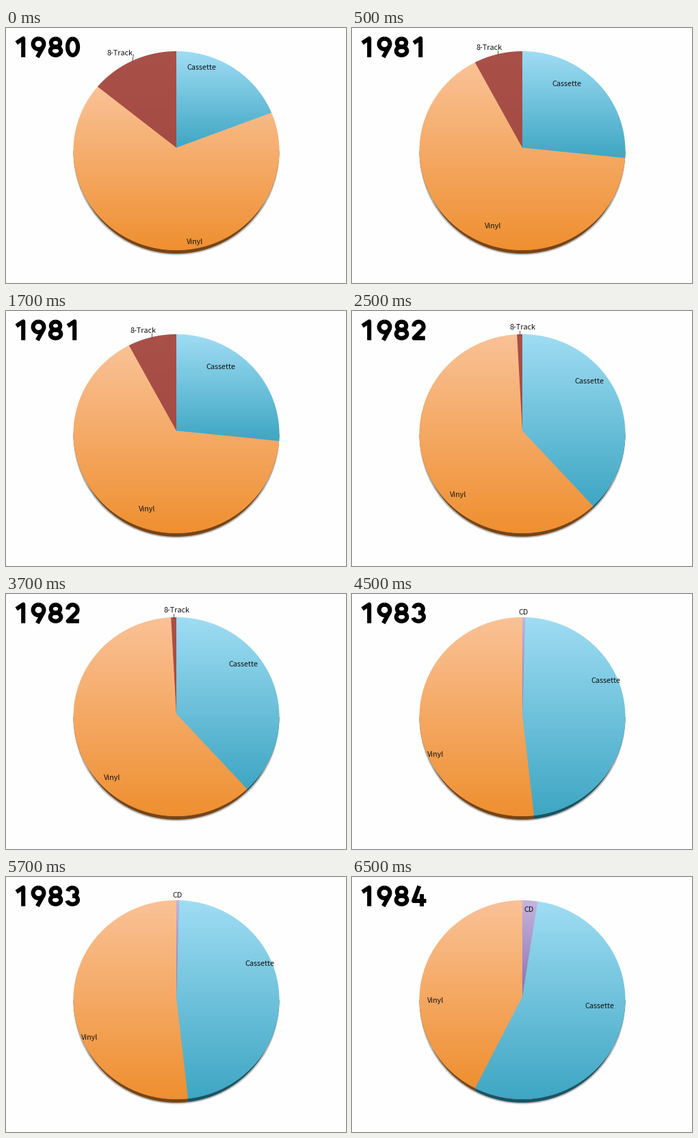
A matplotlib script that plays this animation: 497 px wide and 373 px high, repeating every 8 s.

```python
import numpy as np
import matplotlib.pyplot as plt
from matplotlib.animation import FuncAnimation
from matplotlib.colors import LinearSegmentedColormap
from matplotlib.patches import Ellipse, Polygon

W, H, DPI = 497, 373, 64
PT = 72 / DPI                      # points per pixel
FACE = (249, 179.5, 150.5, 145.5)  # centre x, centre y, radius x, radius y
BASE = (249, 183, 148, 147)
APEX = (249, 175)

# top colour, bottom colour, rim colour
PAINT = {
    "Cassette": ("#a0ddf4", "#3ea6c3", "#185565"),
    "Vinyl": ("#fac297", "#ef8f30", "#7a4413"),
    "8-Track": ("#a95149", "#a44b44", "#552420"),
    "CD": ("#c5b5de", "#8c6eb2", "#45345c"),
}

# per year: slices (name, start, end in degrees), labels (name, centre x, baseline), leader line
YEARS = [
    ("1980",
     [("Vinyl", 67.5, 310.1), ("Cassette", 0, 67.5), ("8-Track", 310.1, 360)],
     [("8-Track", 167, 40), ("Cassette", 285.5, 61), ("Vinyl", 276.3, 316)],
     [(186.5, 39), (185, 48)]),
    ("1981",
     [("Vinyl", 94.2, 332.6), ("Cassette", 0, 94.2), ("8-Track", 332.6, 360)],
     [("8-Track", 201, 32), ("Cassette", 314, 85), ("Vinyl", 206, 293)],
     [(213, 33), (213, 39)]),
    ("1982",
     [("Vinyl", 136.6, 357), ("Cassette", 0, 136.6), ("8-Track", 357, 360)],
     [("8-Track", 249.3, 27), ("Cassette", 347, 106), ("Vinyl", 155.3, 272)],
     [(245, 28.5), (245, 34.5)]),
    ("1983",
     [("Vinyl", 173.5, 360), ("Cassette", 1.5, 173.5), ("CD", 0, 1.5)],
     [("CD", 251, 30), ("Cassette", 370.5, 130), ("Vinyl", 122.5, 238)],
     None),
    ("1984",
     [("Vinyl", 207.3, 360), ("Cassette", 8.4, 207.3), ("CD", 0, 8.4)],
     [("CD", 258, 51), ("Cassette", 361.5, 192), ("Vinyl", 122.5, 184)],
     None),
]


def arc(ellipse, start, end, n=200):
    """Points on an ellipse, degrees clockwise from the top."""
    cx, cy, rx, ry = ellipse
    t = np.radians(np.linspace(start, end, n))
    return np.column_stack([cx + rx * np.sin(t), cy - ry * np.cos(t)])


def digit_strokes(d):
    """Centre lines of a digit in a 25 by 30 cell."""
    return {
        "0": [arc((12.5, 15, 7.6, 12), 0, 360)],
        "1": [[(5.2, 9.2), (15.2, 2.6), (15.2, 30)]],
        "2": [np.vstack([arc((12.4, 10.2, 7.2, 7.2), -88, 122),
                         [(5.6, 27), (21.8, 27)]])],
        "3": [arc((12, 9.2, 6.8, 6.2), -80, 180),
              arc((12.2, 20.8, 7.8, 6.3), 0, 260)],
        "4": [[(13.4, 0.5), (5, 22.3), (23.5, 22.3)], [(17, 12), (17, 30)]],
        "8": [arc((12.5, 9, 6.7, 6), 0, 360),
              arc((12.5, 20.9, 7.8, 6.2), 0, 360)],
        "9": [arc((12.5, 10.6, 7.9, 7.7), 0, 360),
              [(19.4, 14.4), (10.8, 30)]],
    }[d]


def draw_year(text):
    for i, d in enumerate(text):
        for stroke in digit_strokes(d):
            pts = np.array(stroke) + (10 + 25 * i, 12.7)
            ax.plot(*pts.T, color="black", lw=6.1 * PT,
                    solid_capstyle="butt", solid_joinstyle="round")


def draw_shadow():
    for k in range(4):
        ax.add_patch(Ellipse((249, 183.8), 2 * (148.8 + 0.6 * k),
                             2 * (146.6 + 0.7 * k), fc="#555555", alpha=0.17))


def draw_rim(name, start, end):
    a, b = max(start, 90), min(end, 270)
    if a < b:
        edge = np.vstack([arc(BASE, a, b), arc(FACE, b, a)])
        ax.add_patch(Polygon(edge, fc=PAINT[name][2], lw=0))


def draw_slice(name, start, end):
    top, bottom, _ = PAINT[name]
    pad = 0.4 if name == "Vinyl" else 0   # tuck under the neighbours
    points = np.vstack([arc(FACE, start, end), [APEX]])
    clip = Polygon(np.vstack([arc(FACE, start - pad, end + pad), [APEX]]),
                   transform=ax.transData)
    (x0, y0), (x1, y1) = points.min(0), points.max(0)
    ramp = np.linspace(0, 1, 256)[:, None]
    cmap = LinearSegmentedColormap.from_list(name, [top, bottom])
    image = ax.imshow(ramp, cmap=cmap, extent=(x0 - 2, x1 + 2, y1 + 1, y0 - 1),
                      aspect="auto", interpolation="bilinear", zorder=2)
    image.set_clip_path(clip)


def draw(frame):
    ax.clear()
    ax.axis("off")
    year, slices, labels, leader = YEARS[(frame + 3) // 4]
    draw_shadow()
    for s in slices:
        draw_rim(*s)
    for s in slices:
        draw_slice(*s)
    if leader:
        ax.plot(*zip(*leader), color="#444444", lw=0.9 * PT, zorder=3)
    for name, x, y in labels:
        ax.text(x, y, name, ha="center", va="baseline", color="#111111",
                family="Noto Sans CJK JP", size=10.75 * PT, zorder=4)
    draw_year(year)
    ax.set_xlim(0, W)
    ax.set_ylim(H, 0)


fig = plt.figure(figsize=(W / DPI, H / DPI), dpi=DPI, facecolor="#fdfefd")
ax = fig.add_axes([0, 0, 1, 1])
anim = FuncAnimation(fig, draw, frames=16, init_func=lambda: draw(0),
                     interval=500, repeat=True, repeat_delay=0)
plt.show()
```
